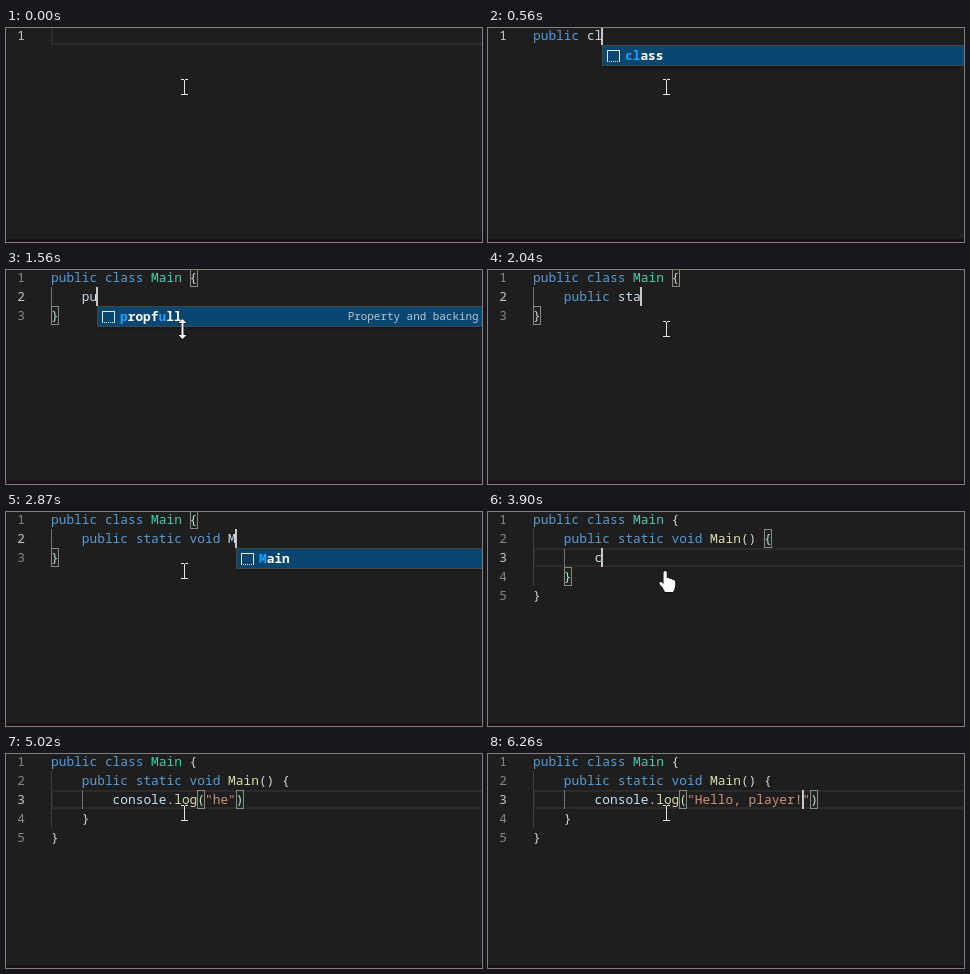
An HTML page with a canvas that plays this animation: 476x214 px, repeating every 6.28 s.

```html
<!DOCTYPE html>
<html lang="en">
<head>
<meta charset="utf-8">
<title>Typing in a code editor</title>
<style>
  html, body { margin: 0; width: 100%; height: 100%; overflow: hidden; background: #1e1e1e; }
  canvas { display: block; }
</style>
</head>
<body>
<canvas id="stage" width="476" height="214"></canvas>
<script>
const ctx = document.getElementById('stage').getContext('2d');
const LOOP = 6280, LEFT = 45, TOP = -2, ROW = 19, CHAR = 7.7;
const MONO = '"Noto Sans Mono", "DejaVu Sans Mono", monospace';
const CODE = `12.83px ${MONO}`, BOLD = `600 12.83px ${MONO}`, SMALL = `500 10.92px ${MONO}`;
const MOUSE = { x: 178, y: 59 };
const POPUP_DELAY = 20;

// keys, time of the first, time of the last
const RUNS = [
  ['public cl', 30, 550], ['a', 600, 600], ['ss Main {', 680, 1270],
  ['\npu', 1310, 1550], ['blic s', 1610, 1930], ['ta', 1960, 2020],
  ['tic voi', 2100, 2560], ['d Main()', 2640, 3190], [' ', 3250, 3250],
  ['{', 3270, 3270], ['\n', 3600, 3600], ['console.log', 3900, 4510],
  ['("he', 4530, 4960], ['\b\b', 5060, 5100],
  ['Hello, play', 5200, 5820], ['er!', 5850, 6050]
];
const CARET_OFF = [[0, 30], [5020, 5060], [6160, 6260]];

const SNIPPETS = ['checked', 'class', 'ctor', 'cw', 'prop', 'propfull', 'propg', 'propi',
  'sim', 'struct', 'svm', 'switch'];
const DETAILS = {
  prop: 'An automatically implemented property',
  propfull: 'Property and backing field'
};
const KEYWORDS = ['public', 'class', 'static', 'void'];
const PAIRS = { '{': '}', '(': ')', '"': '"' };

const colX = col => LEFT + col * CHAR;
const rowY = row => TOP + row * ROW;
const indentOf = line => line.match(/^ */)[0].length;

function press({ before, after }, key) {
  if (key === '\b') return { before: before.slice(0, -1), after };
  if (key === '\n') {
    const pad = ' '.repeat(indentOf(before.split('\n').pop()));
    return { before: `${before}\n${pad}    `, after: `\n${pad}${after}` };
  }
  if (key === ')' && after[0] === ')') return { before: before + key, after: after.slice(1) };
  return { before: before + key, after: (PAIRS[key] || '') + after };
}

// Indices of the letters of word inside label, or null
function match(label, word) {
  if (label[0] !== word[0]) return null;
  const hits = [];
  let at = -1;
  for (const c of word) {
    at = label.indexOf(c, at + 1);
    if (at < 0) return null;
    hits.push(at);
  }
  return hits;
}

function suggest(line, row, col) {
  const typed = line.slice(0, col);
  const word = typed.match(/[A-Za-z]*$/)[0];
  if (!word || typed.split('"').length % 2 === 0) return null;
  const items = SNIPPETS.concat(row ? 'Main' : [])
    .map(label => ({ label, hits: match(label, word) }))
    .filter(item => item.hits);
  if (!items.length) return null;
  return { items, x: Math.round(colX(col)), y: rowY(row + 1), h: items.length * ROW + 2 };
}

function enclosing(text, pos) {
  let depth = 0;
  for (let i = pos - 1; i >= 0; i--) {
    if ('})'.includes(text[i])) depth++;
    else if ('{('.includes(text[i]) && depth-- === 0) {
      const open = text[i], close = PAIRS[open];
      for (let j = i + 1, d = 0; j < text.length; j++) {
        if (text[j] === open) d++;
        else if (text[j] === close && d-- === 0) return [i, j];
      }
    }
  }
  return [];
}

function locate(text, pos) {
  const head = text.slice(0, pos).split('\n');
  return { row: head.length - 1, col: head.pop().length };
}

function makeState(time, doc, previous) {
  const text = doc.before + doc.after;
  const lines = text.split('\n');
  const caret = locate(text, doc.before.length);
  const popup = suggest(lines[caret.row], caret.row, caret.col);
  const brackets = enclosing(text, doc.before.length).map(i => locate(text, i));
  const popupAt = time + (previous && previous.popup ? 0 : POPUP_DELAY);
  return { time, lines, caret, popup, popupAt, brackets };
}

const states = [];
let doc = { before: '', after: '' };
states.push(makeState(0, doc));
for (const [keys, from, to] of RUNS) {
  [...keys].forEach((key, i) => {
    doc = press(doc, key);
    const time = from + (to - from) * i / Math.max(1, keys.length - 1);
    states.push(makeState(time, doc, states[states.length - 1]));
  });
}

function rect(x, y, w, h, color) {
  ctx.fillStyle = color;
  ctx.fillRect(x, y, w, h);
}

function write(text, x, y, color, font = CODE) {
  ctx.font = font;
  ctx.fillStyle = color;
  ctx.fillText(text, x, y);
}

function frame(x, y, w, h, color) {
  ctx.strokeStyle = color;
  ctx.lineWidth = 1;
  ctx.strokeRect(x + .5, y + .5, w - 1, h - 1);
}

function colorOf(token, before, after) {
  if (token[0] === '"') return '#ce9178';
  if (KEYWORDS.includes(token)) return '#569cd6';
  if (!/[A-Za-z]/.test(token)) return '#d4d4d4';
  if (before.endsWith('class ')) return '#4ec9b0';
  if (after[0] === '(') return '#dcdcaa';
  return '#c8e0ee';
}

function drawLine(line, row, state) {
  const y = rowY(row), active = state.caret.row === row;
  write(row + 1, 11.2, y + 14, active ? '#c6c6c6' : '#858585');
  const level = indentOf(state.lines[state.caret.row]) / 4 - 1;
  for (let k = 0; k < indentOf(line) / 4; k++) {
    rect(Math.round(colX(k * 4)), y, 1, ROW, k === level ? '#707070' : '#404040');
  }
  for (const m of line.matchAll(/"[^"]*"?|[A-Za-z]+|\S/g)) {
    const before = line.slice(0, m.index), after = line.slice(m.index + m[0].length);
    write(m[0], colX(m.index), y + 14, colorOf(m[0], before, after));
  }
}

function drawPopup({ items, x, y, h }) {
  const width = 430;
  rect(x, y + h, width, 2, '#191919');
  rect(x, y, width, h, '#252526');
  items.forEach(({ label, hits }, i) => {
    const top = y + 1 + i * ROW;
    if (!i) rect(x, top, width, ROW, '#094771');
    frame(x + 5, top + 4, 13, 12, '#e4e8ec');
    for (let d = 1; d < 12; d += 2) rect(x + 5 + d, top + 15, 1, 1, i ? '#252526' : '#094771');
    [...label].forEach((c, n) => {
      const hit = hits.includes(n);
      write(c, x + 23 + n * CHAR, top + 14, hit ? '#18a3ff' : i ? '#d4d4d4' : '#ffffff',
        hit || !i ? BOLD : CODE);
    });
    if (!i && DETAILS[label]) {
      write(DETAILS[label], x + 421 - DETAILS[label].length * 6.55, top + 13, '#b4c4d0', SMALL);
    }
  });
  frame(x, y, width, h, '#454545');
}

function shape(path, x, y) {
  ctx.save();
  ctx.translate(x, y);
  const p = new Path2D(path);
  ctx.strokeStyle = '#000';
  ctx.lineWidth = 1;
  ctx.stroke(p);
  ctx.fillStyle = '#fff';
  ctx.fill(p);
  ctx.restore();
}

function drawMouse(popup) {
  const { x, y } = MOUSE;
  const over = popup && popup.x < x && popup.y < y;
  const edge = popup ? popup.y + popup.h : 0;
  if (over && Math.abs(edge - y) < 4) {
    shape('M0-10 L4-6 H1 V6 H4 L0 10 L-4 6 H-1 V-6 H-4Z', x - 1.5, y);
  } else if (over && edge > y) {
    shape('M-2.5 2 Q-2.5 0-1 0 Q.8 0 .8 2 V7 Q3 6 3.7 8 Q6 7 6.7 9 Q9.2 8.5 9.2 11 ' +
      'V15 Q9 18 7 21 H-1 Q-2.5 17-6.5 13 Q-7 10.5-4.5 11 L-2.5 13Z', x, y);
  } else {
    rect(x, y - 7, 1, 15, '#e6e6e6');
    for (const end of [y - 8, y + 7]) {
      rect(x - 3, end, 3, 1, '#e6e6e6');
      rect(x + 1, end, 3, 1, '#e6e6e6');
    }
  }
}

function draw(t) {
  const state = states.findLast(s => s.time <= t);
  const { caret, popup } = state;
  const x = colX(caret.col), y = rowY(caret.row);

  rect(0, 0, 476, 214, '#1e1e1e');
  if (t < 30 || t >= 3900) {
    rect(LEFT, y, 440, 2, '#2b2b2b');
    rect(LEFT, y + ROW - 2, 440, 2, '#2b2b2b');
    rect(LEFT, y, 2, ROW, '#2b2b2b');
  }
  for (const b of state.brackets) {
    const bx = Math.round(colX(b.col)), by = rowY(b.row);
    rect(bx, by, 8, ROW, 'rgba(0,100,0,.1)');
    frame(bx, by, 8, ROW, '#888888');
  }
  state.lines.forEach((line, row) => drawLine(line, row, state));
  if (!CARET_OFF.some(([from, to]) => t >= from && t < to)) {
    rect(Math.round(x) - 1, y, 2, ROW, '#c8c8c8');
  }
  if (popup && t >= state.popupAt) drawPopup(popup);
  rect(0, 211, 476, 3, '#1b0f16');
  drawMouse(popup);
}

function tick() {
  draw(performance.now() % LOOP);
  requestAnimationFrame(tick);
}
tick();
</script>
</body>
</html>
```
